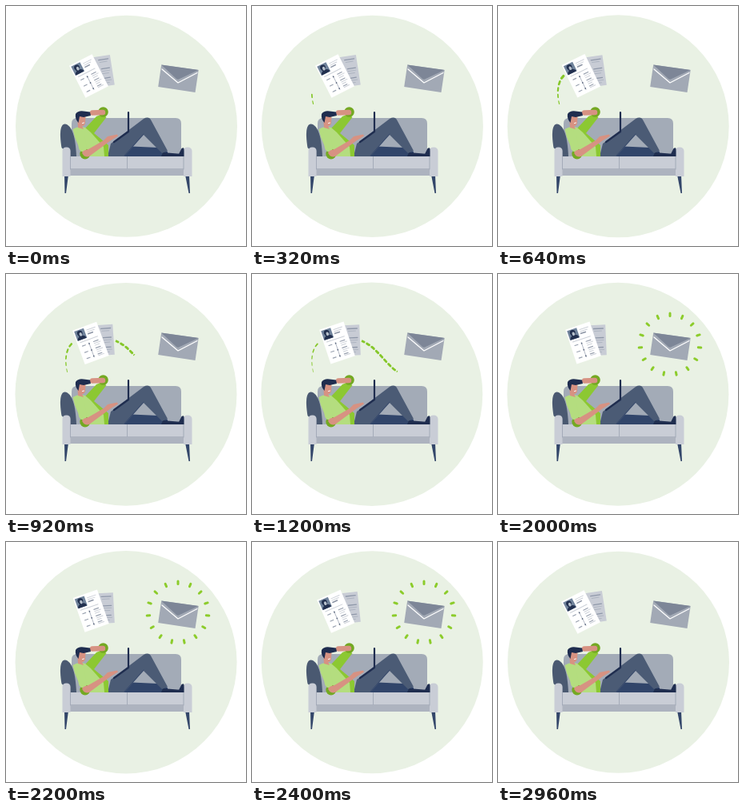
An HTML page that plays this animation: 300x300 px, repeating every 3000 ms.

```html
<!DOCTYPE html>
<html lang="en">
<head>
<meta charset="utf-8">
<title>Job application</title>
<style>
html, body { margin: 0; width: 100%; height: 100%; overflow: hidden; background: #fff; }
svg { display: block; width: 100vw; height: 100vh; }
</style>
</head>
<body>
<svg viewBox="0 0 300 300" fill="none" stroke-linecap="round" stroke-linejoin="round">
  <defs>
    <path id="route" pathLength="100" d="M137 83.5C155 91 164 108 178 119.500C192 131 212 127 212 109.500"/>
    <mask id="reveal" maskUnits="userSpaceOnUse" x="0" y="0" width="300" height="300">
      <use href="#route" id="wipe" stroke="#fff" stroke-width="10" stroke-linecap="butt"/>
    </mask>
  </defs>
  <ellipse id="disc" rx="138.500" fill="#e9f1e4"/>

  <g id="trail" stroke="#85c729"></g>
  <g id="flight" mask="url(#reveal)">
    <use href="#route" stroke="#85c729" stroke-width="2.900" stroke-dasharray="3.400 4.060"/>
  </g>

  <g id="back">
    <path fill="#c8ccd5" d="M-15-19h30v38h-30z"/>
    <path stroke="#8f98a9" stroke-width="1.300" d="M0-14.500h12M2-3h10M2 9h9"/>
    <path stroke="#adb4c0" stroke-width="1" d="M1-11.500h9M2 0h10M2 3h8M2 12h10M2 15h7"/>
  </g>
  <g id="front">
    <path fill="#fff" d="M-16-22.500h32v45h-32z"/>
    <path fill="#70839b" d="M-14.500-20.500h12.500v12.500h-12.500z"/>
    <path fill="#22304f" d="M-14-8q0-4 5.500-4.500t6 4.500zM-12-16q0-4 4-3.500t2.500 5l-2 3h-3z"/>
    <ellipse cx="-8" cy="-14.500" rx="1.700" ry="2.400" fill="#b9c2cd"/>
    <path stroke="#8d95a5" stroke-width="1.600" d="M1-12h6"/>
    <path stroke="#ced2d9" stroke-width="1" d="M1-17h11M1-14.500h9M-12-5h23M4 2h8M4 4.500h6M4 10.500h8M4 13h5M4 18h7"/>
    <path stroke="#9aa2b0" stroke-width="1.200" d="M-11 0h4M-11 8.500h4M-11 16.500h4M4-.5h6M4 8h6M4 16h5"/>
    <path stroke="#8a93a5" stroke-width=".6" d="M-2-1v19"/>
    <path stroke="#5e6a80" stroke-width="1.800" d="M-2 0h0M-2 8.500h0M-2 16.500h0"/>
  </g>

  <g id="burst" stroke="#8ccc2b" stroke-width="3"></g>
  <path fill="#a2a9b5" d="M194.200 73.500L240.700 80L236.500 108L190.200 101z"/>
  <path stroke="#fff" stroke-width="1.200" d="M195 79L215 96L239 83.500"/>
  <path fill="#7d8697" d="M194.200 73.500L240.700 80L216 91.500Q214.500 92 213 91z"/>

  <!-- sofa -->
  <path fill="#33466a" d="M73 211h5l-3 23h-1.500zM224 211h5l1 23h-1.500z"/>
  <path fill="#a3abb7" d="M82 190V147q0-7 7-7h123q7 0 7 7v43z"/>
  <path fill="#4a5971" d="M69.500 177C67 162 67 148 73.500 147.500C83 148.500 87 165 88 188H80z"/>
  <path fill="#c9cdd6" d="M79 188h144v15H79z"/>
  <path fill="#adb3bf" d="M79 203h144v9H79z"/>
  <path stroke="#9ba3b1" stroke-width=".8" d="M151.500 188v15"/>
  <path fill="#c9cdd6" d="M70.500 213V181q0-4.500 5-4.500t5 4.500v32zM222 213V181q0-4.500 5-4.500t5.500 4.500v32z"/>
  <path stroke="#9ba3b1" stroke-width=".8" d="M80.500 181v23M222 181v23"/>

  <!-- reader -->
  <path fill="#31456a" d="M146 175L190 177L202 182V188H146z"/>
  <path fill="#1f2d4f" d="M194 188l2-5l12 1l12 1l1 3zM219.500 178q3-2 3 1v9h-8z"/>
  <path fill="#4b5b75" d="M127 188L131 172L172 141Q179 137 182 144L202 181L195 184L172 161L148 188z"/>
  <path stroke="#31456a" stroke-width=".8" d="M172 160L148 187"/>
  <path fill="#8cc832" d="M99 153L113 138Q120 134 125.500 139L110 159L128 174V188H116z"/>
  <path fill="#b4dd7f" d="M83.500 154Q91 149 99 152L106 158L122 176L123 188H101Q87 174 83.500 154z"/>
  <circle cx="121.500" cy="132.500" r="6.300" fill="#74a922"/>
  <path stroke="#d79282" stroke-width="6.500" d="M121 133L108 133.500"/>
  <path fill="#d79282" d="M89 137H99.500L99 147Q97 151 95 150L97 154L90 152z"/>
  <path fill="#1f2d4f" d="M87 135Q90 130.500 97 131.500L105 132.500L106 137L97 139L92 138L90.500 146Q86 141 87 135z"/>
  <path stroke="#fff" stroke-width="1" d="M95.500 146.500l2-.5"/>
  <circle cx="98.800" cy="185" r="6.500" fill="#74a922"/>
  <path stroke="#b4dd7f" stroke-width="10" d="M93 162L96 177"/>
  <path fill="#d79282" d="M95 183Q97 180 103 179L122 168L127 163L139 160.500L140 162.500L131 168L104 188Q97 190 95 183z"/>
  <path stroke="#1f2d4f" stroke-width="2.200" d="M153 133V157L135 170"/>
</svg>
<script>
const $ = id => document.getElementById(id);
const LOOP = 3000, STEP = 40, DASHES = 5;
const ramp = (t, a, b) => Math.min(1, Math.max(0, (t - a) / (b - a)));
const ease = (t, a, b) => (1 - Math.cos(Math.PI * ramp(t, a, b))) / 2;
const mix = (a, b, p) => a + (b - a) * p;

function addPath(parent, d) {
  const path = document.createElementNS('http://www.w3.org/2000/svg', 'path');
  path.setAttribute('d', d);
  return parent.appendChild(path);
}

// Dashes along the arc from the reader up to the papers
const arc = addPath($('trail'), 'M77 124C73 110 74 93 84 85.5');
const length = arc.getTotalLength();
const dashes = Array.from({ length: DASHES }, (_, i) => {
  const at = k => {
    const p = arc.getPointAtLength(length * (i + k) / DASHES);
    return `${p.x} ${p.y}`;
  };
  return addPath($('trail'), `M${at(.2)}L${at(.65)}`);
});
arc.remove();

const rays = Array.from({ length: 15 }, (_, i) => {
  const ray = addPath($('burst'), '');
  ray.setAttribute('transform', `translate(215 88) rotate(${i * 24})`);
  return ray;
});

function place(id, from, to, p) {
  const [x, y, angle] = from.map((v, i) => mix(v, to[i], p));
  $(id).setAttribute('transform', `translate(${x} ${y}) rotate(${angle})`);
}

function draw(t) {
  const sway = (1 - Math.cos(2 * Math.PI * t / LOOP)) / 2;
  $('disc').setAttribute('cx', mix(150.5, 149.7, sway));
  $('disc').setAttribute('cy', 150.3);
  $('disc').setAttribute('ry', mix(138.5, 139.8, sway));

  const turn = ease(t, 500, 1100) - ease(t, 2100, 2650);
  place('back', [118, 82, -9], [120, 83, -2.5], turn);
  place('front', [103.5, 87.5, -27], [106.5, 86, -18.5], turn);

  const linked = t < 1880;
  const grown = ramp(t, 160, 600) * DASHES;
  const thin = mix(1, .4, ramp(t, 640, 1400));
  dashes.forEach((dash, i) => {
    dash.style.display = linked && grown > i ? '' : 'none';
    dash.setAttribute('stroke-width', mix(1.2, 3.2, i / (DASHES - 1)) * thin);
  });

  $('flight').style.display = linked && t > 640 ? '' : 'none';
  $('wipe').setAttribute('stroke-dasharray', `${104 * ramp(t, 640, 1620)} 200`);

  const out = ease(t, 1840, 1960), gone = ease(t, 2600, 2760);
  $('burst').style.display = out > 0 && gone < 1 ? '' : 'none';
  rays.forEach(ray => ray.setAttribute('d', `M0 ${-mix(35.5, 39, gone)}V${-mix(35.5, 39, out)}`));
}

const start = performance.now();
function tick() {
  const t = (performance.now() - start) % LOOP;
  draw(Math.floor(t / STEP) * STEP);
  requestAnimationFrame(tick);
}
tick();
</script>
</body>
</html>
```
